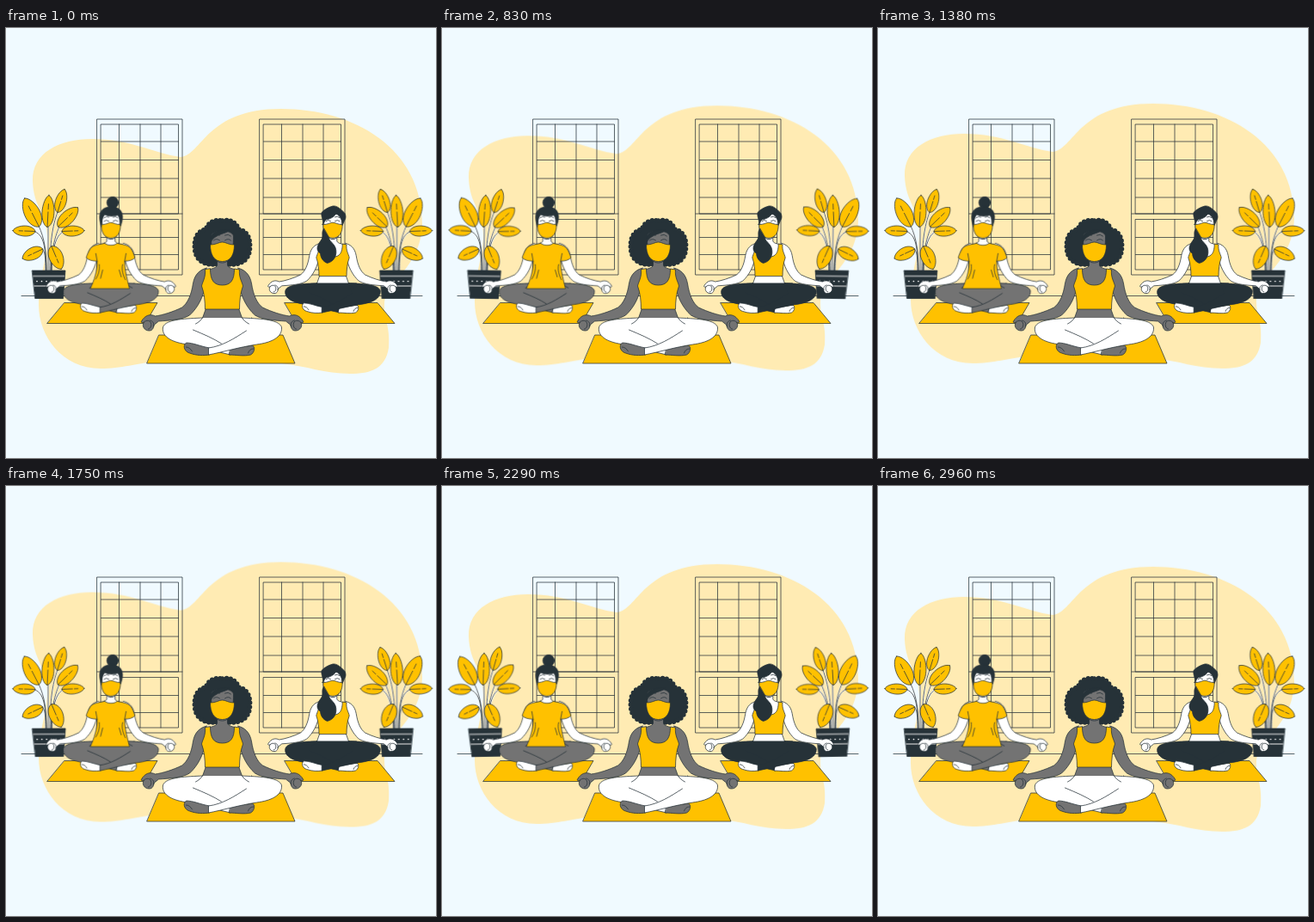
Write an HTML page that moves like this. It is 500 px wide and 500 px high and loops after 3 s.

```html
<!DOCTYPE html>
<html lang="en">
<head>
<meta charset="utf-8">
<title>Yoga class</title>
<style>
  html, body { margin: 0; width: 100%; height: 100%; overflow: hidden; background: #f0faff; }
  svg { display: block; width: 100%; height: 100%; }
  path, circle { vector-effect: non-scaling-stroke; }
  .line { fill: none; }
  .ink { stroke: #263238; stroke-width: .75; stroke-linecap: round; stroke-linejoin: round; }
  .gold { fill: #ffc100; }
  .dark { fill: #263238; }
  .skin { fill: var(--skin); }
  .pants { fill: var(--pants); }
  .float { animation: float 3s linear infinite; }
  .wind { transform-origin: 49.5px 251px; animation: wind 3s linear infinite; }
  .wind.back { animation-name: wind-back; }
  @keyframes float { 50% { transform: translateY(-6.67px); } }
  @keyframes wind { 25% { transform: rotate(1deg); } 75% { transform: rotate(-1deg); } }
  /* inside the mirrored plant the turn is reversed */
  @keyframes wind-back { 25% { transform: rotate(-1deg); } 75% { transform: rotate(1deg); } }
</style>
</head>
<body>
<svg viewBox="0 0 500 500">
  <defs>
    <g id="window" class="line">
      <path d="M106 106H205V287H106ZM110.5 112H200.5V216H110.5ZM110.5 222.500H200.5V281H110.5ZM106 216H205"/>
      <path d="M131.5 112V216M156 112V216M180 112V216M131.5 222.500V281M156 222.500V281M180 222.500V281"/>
      <path d="M110.5 132H200.5M110.5 153.500H200.5M110.5 175H200.5M110.5 197H200.5M110.5 243.500H200.5M110.5 263.500H200.5"/>
    </g>

    <g id="leaf">
      <path class="gold" d="M0 -1C.55 -.9 1 -.4 1 .1C1 .6 .5 .95 0 1C-.5 .95 -1 .6 -1 .1C-1 -.4 -.55 -.9 0 -1Z"/>
      <path class="line" d="M0 1V.05M0 -.12V-.45"/>
    </g>

    <g id="plant">
      <g class="line" stroke="#fff" stroke-width="1.6">
        <path d="M47 282C47 260 45 245 38 230M49 282V231M51 282C51 250 54 230 60 214M52 282C53 255 58 240 62 231M47 282C46 255 44 241 34 237M53 282C54 255 58 242 66 237M46 282C46 265 45 256 40 256M53 282V254"/>
      </g>
      <path class="line" d="M47 282C47 260 45 245 38 230M49 282V231M51 282C51 250 54 230 60 214M52 282C53 255 58 240 62 231M47 282C46 255 44 241 34 237M53 282C54 255 58 242 66 237M46 282C46 265 45 256 40 256M53 282V254"/>
      <use href="#leaf" transform="translate(64 201) rotate(17) scale(6.300 14)"/>
      <use href="#leaf" transform="translate(49 213) rotate(3) scale(7 18.500)"/>
      <use href="#leaf" transform="translate(30 214.500) rotate(-27) scale(9 18.500)"/>
      <use href="#leaf" transform="translate(72 220) rotate(46) scale(7.500 16)"/>
      <use href="#leaf" transform="translate(21 236) rotate(-88) scale(6 13)"/>
      <use href="#leaf" transform="translate(78 236) rotate(88) scale(6 13)"/>
      <use href="#leaf" transform="translate(31 262.500) rotate(-115) scale(7 13)"/>
      <use href="#leaf" transform="translate(58.500 267) rotate(157) scale(8 14.500)"/>
      <path class="dark" d="M30.500 282H69L66.500 314.500H34Z"/>
      <path d="M32 288.500H67.500M33 300H66.500" stroke="#8a8f92" stroke-width="1.800"/>
      <path d="M36 294.500H66" stroke="#fff" stroke-width="1.700" stroke-dasharray="0 5.500"/>
    </g>

    <path id="arm" class="skin" d="M-18 279C-26 281 -32 286 -34 297C-36 310 -40 320 -47 325C-57 330 -70 334 -78 335C-84 332 -90 334 -94 341C-95 343 -92 343 -91 342C-94 346 -91 352 -85 352C-80 352 -80 347 -79 345L-74 341C-60 340 -46 339 -38 334C-28 325 -22 312 -20 300"/>
    <path id="fingers" class="line" d="M-91 342C-88 339 -84 340 -83 343C-82 347 -84 350 -86 350M-84 340C-80 341 -79 344 -80 347"/>

    <g id="body">
      <path class="skin" d="M-6 266V276C-7 280 -16 280 -22 283C-24 296 -18 310 -19 326L-24 340H24L19 326C18 310 24 296 22 283C16 280 7 280 6 276V266Z"/>
      <path class="pants" d="M-23 337C-40 338 -66 338 -69 348C-71 360 -56 366 -40 368C-22 372 -5 377 10 380L14 372L34 362V337"/>
      <path class="skin" d="M10 371C20 372 28 370 35 369C39 371 37 378 33 380C25 382 16 380 8 380ZM-15 372C-26 370 -34 366 -42 366C-47 370 -43 377 -38 378C-30 381 -22 381 -15 380Z"/>
      <path class="line" d="M-42 371C-39 371 -37 373 -35 376M36 373C33 373 31 375 30 378"/>
      <path class="pants" d="M23 337C40 338 66 338 69 348C70 360 56 366 40 368C20 371 0 377 -16 380L-16 372C0 370 14 361 28 352"/>
      <path class="line" d="M-34 351C-22 356 -10 361 -1 367M-23 337C-25 340 -27 342 -31 344M23 337C25 340 27 342 31 344"/>
      <use href="#arm"/>
      <use href="#fingers"/>
      <g transform="scale(-1 1)"><use href="#arm"/><use href="#fingers"/></g>
    </g>

    <g id="face">
      <path class="skin" d="M-13 242C-13 263 -9 273 0 273S13 263 13 242C12 234 -12 234 -13 242Z"/>
      <path class="line" d="M-10 247Q-7 244 -3 247M3 247Q7 244 10 247M-10 242Q-7 239 -3 241M3 241Q7 239 10 242"/>
      <path class="gold" d="M-14 252C-7 252 -4 249 0 249S7 252 14 252C14 263 10 271.500 0 271.500S-14 263 -14 252Z"/>
    </g>
    <path id="chin" class="dark" d="M-9 266Q0 281 9 266Z"/>

    <path id="tank" class="gold" d="M-20 281C-19 290 -23 295 -24 300C-21 308 -20 318 -20 327H20C20 318 21 308 24 300C23 295 19 290 20 281L14 280C14 293 10 299 0 299S-14 293 -14 280Z"/>
    <path id="curls" d="M0 224C12 222 17 228 19 234C30 236 33 246 32 257C31 271 20 276 8 275H-8C-20 276 -31 271 -32 257C-33 246 -30 236 -19 234C-17 228 -12 222 0 224Z"/>
  </defs>

  <path class="float" fill="#ffebb3" d="M31 178C30 145 62 129 100 129C145 129 172 146 203 150C228 148 232 94 320 94C405 94 484 140 484 228C482 280 443 292 440 320C439 340 447 345 445 372C441 396 425 402 400 402C370 402 350 393 320 390L180 387C150 390 135 396 110 396C65 396 38 358 38 322C38 290 48 268 48 245C48 215 32 210 31 178Z"/>

  <g class="ink">
    <use href="#window"/>
    <use href="#window" x="189"/>
    <path d="M18 311.500H484"/>

    <use href="#plant" class="wind"/>
    <g transform="matrix(-1 0 0 1 503.500 0)"><use href="#plant" class="wind back"/></g>

    <path class="gold" d="M68 319.500H176L162 343.500H48ZM324 319.500H432L452 343.500H338ZM178 357H322L336 390H164Z"/>

    <g transform="translate(122 27) scale(.8)" style="--skin:#fff;--pants:#737373">
      <use href="#body"/>
      <path class="gold" d="M-9 279C-16 281 -26 281 -30 287C-33 292 -35 297 -36 300C-32 304 -26 305 -20 305C-20 320 -24 332 -30 345H27C24 332 20 320 20 305C26 305 31 304 35 300C33 295 32 291 29 287C25 281 16 281 9 279C5 283 -5 283 -9 279Z"/>
      <path class="line" d="M-20 305L-22 294M20 305L22 294M-17 310C-16 318 -18 325 -22 331M17 310C15 318 18 326 21 332M-12 318L-15 330M12 318L15 328"/>
      <use href="#chin"/>
      <use href="#face"/>
      <circle class="dark" cx="2.500" cy="220" r="8.500"/>
      <path class="dark" d="M-14 255C-18 241 -19 227 0 226C19 226 19 242 14 254C13 247 13 242 10 238C3 241 -5 240 -9 237C-13 242 -13 248 -14 255Z"/>
    </g>

    <g transform="translate(380 27) scale(.8)" style="--skin:#fff;--pants:#263238">
      <use href="#body"/>
      <use href="#tank"/>
      <use href="#chin"/>
      <use href="#face"/>
      <path class="dark" d="M-15 252C-12 247 -18 241 -16 234C-12 230 -7 227 0 225C6 224 12 230 15 233C19 236 20 242 17 246L14 253C14 246 11 240 5 236C1 242 -5 244 -10 245ZM-13 258C-18 264 -12 269 -18 276C-24 284 -24 290 -18 294C-18 300 -14 306 -8 308C2 306 7 296 4 286C1 278 -6 276 -6 270Z"/>
    </g>

    <g transform="translate(251.500 0)" style="--skin:#737373;--pants:#fff">
      <use href="#curls" class="dark"/>
      <use href="#curls" class="line" stroke-width="5.500" stroke-dasharray="0 4.800"/>
      <use href="#body"/>
      <use href="#tank"/>
      <use href="#face"/>
      <path class="dark" d="M-14 250C-15 238 -6 234 8 235C5 240 -8 238 -14 250Z"/>
    </g>
  </g>
</svg>
</body>
</html>
```
